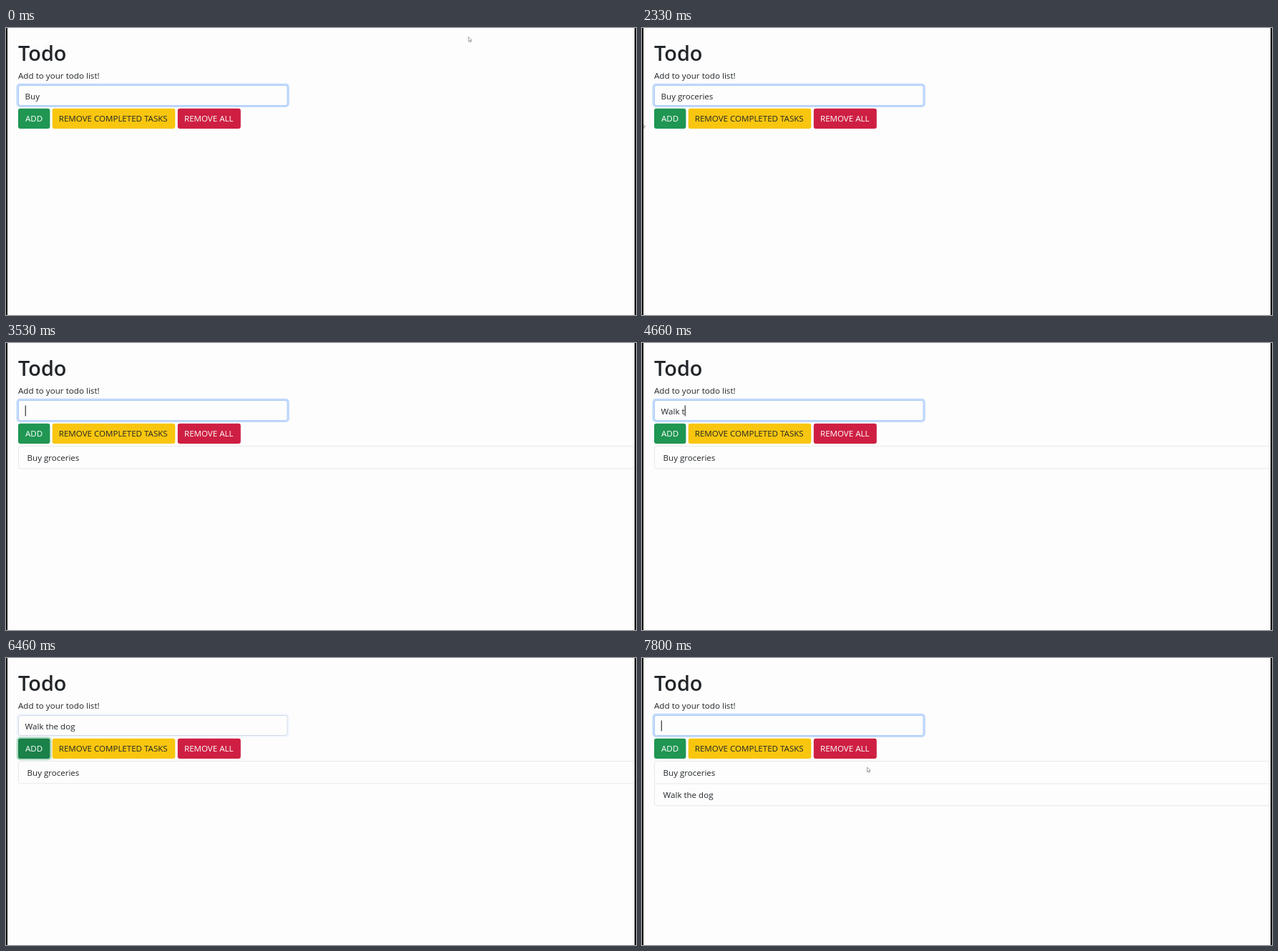
These frames come from a looping animation (880x402 px, 8000 ms). An HTML page:

```html
<!DOCTYPE html>
<html lang="en">
<head>
<meta charset="utf-8">
<title>Todo</title>
<style>
  html, body { margin: 0; width: 100%; height: 100%; overflow: hidden; background: #fdfdfd; }
  svg { display: block; width: 100vw; height: 100vh; }
  text { font: 11.55px "Open Sans", "Noto Sans", sans-serif; fill: #212529; white-space: pre; }
  .title { font-size: 28.8px; font-weight: 600; }
  .light { fill: #fff; }
  .line { fill: none; stroke: #e8e8e8; }
</style>
</head>
<body>
<svg viewBox="0 0 880 402">
  <rect width="880" height="402" fill="#fdfdfd"/>
  <text class="title" x="17" y="45.5">Todo</text>
  <text x="17" y="70.8" style="font-size:11.65px">Add to your todo list!</text>

  <rect id="inputRing" x="14.5" y="77.8" width="381.3" height="33.2" rx="5" fill="#c2dafc"/>
  <rect id="inputBox" x="17.5" y="80.5" width="375.5" height="28" rx="2.8" fill="#fdfdfd"/>
  <text id="entry" x="26.6" y="99.5"></text>
  <rect id="caret" y="87.5" width="1.1" height="15" fill="#222"/>

  <rect id="addRing" x="14.6" y="110.4" width="49.2" height="32.8" rx="5" fill="#a5d5bb"/>
  <rect id="addBox" x="17" y="112.8" width="44.4" height="28.2" rx="3"/>
  <text class="light" x="27" y="131.4">ADD</text>
  <rect x="64.7" y="112.8" width="171.6" height="28.2" rx="3" fill="#f9c60f"/>
  <text x="73.8" y="131.4">REMOVE COMPLETED TASKS</text>
  <rect x="239.8" y="112.8" width="88" height="28.2" rx="3" fill="#ce1f43"/>
  <text class="light" x="249" y="131.4">REMOVE ALL</text>

  <g id="list">
    <rect id="listBox" class="line" x="17.5" y="144.6" width="880" rx="3"/>
    <text x="29.6" y="165.2">Buy groceries</text>
    <g id="second">
      <path class="line" d="M17.5 176H880"/>
      <text x="29.6" y="195.8">Walk the dog</text>
    </g>
  </g>

  <path id="pointer" d="M0 0V6.5L1.5 5.2 2.6 7.5 3.6 7 2.6 4.8H4.8Z" fill="#fff" stroke="#858585" stroke-width=".8"/>
  <path d="M0 0H2V402H0ZM878 0H880V402H878Z"/>
</svg>
<script>
const LOOP = 8000, KEY = 66, BLINK = 530, FADE = 170, LAG = 130, RELEASE = 160;

// Each round: bursts of typing, a press on ADD, then a click back into the input.
const rounds = [
  { bursts: [[-1200, "Buy "], [600, "grocer"], [1150, "ies"]], press: 2700, focus: 3210 },
  { bursts: [[4200, "Wa"], [4400, "lk th"], [4800, "e d"], [5264, "og"]], press: 6340, focus: 6735 }
];

// Stretches in which the arrow shows; it rests at its end point until hidden.
const trips = [
  { start: 0, end: 1, hide: 600, from: [646, 12.5], to: [646, 12.5] },
  { start: 1800, end: 2330, hide: 2440, from: [622, 1], to: [0, 133] },
  { start: 5860, end: 5990, hide: 5990, from: [171, 72.5], to: [152, 78] },
  { start: 7130, end: 7400, hide: LOOP, from: [350, 111], to: [314.5, 153] }
];

const $ = id => document.getElementById(id);
const set = (id, attrs) => {
  for (const key in attrs) $(id).setAttribute(key, attrs[key]);
};
const show = (id, on) => set(id, { visibility: on ? "inherit" : "hidden" });
const mix = (a, b, k) => a + (b - a) * k;
const blend = (a, b, k) => `rgb(${a.map((v, i) => Math.round(mix(v, b[i], k)))})`;

function ease(t, start, length) {
  const k = Math.min(1, Math.max(0, (t - start) / length));
  return k * k * (3 - 2 * k);
}

// Rises to 1 at one moment and falls back at another, summed over the rounds.
const pulse = (t, rise, fall) => rounds.reduce(
  (sum, r) => sum + ease(t, rise(r), FADE) - ease(t, fall(r), FADE), 0);

function typedText(t) {
  const round = rounds.find(r => t < r.press + RELEASE);
  if (!round) return "";
  return round.bursts.map(([at, text]) =>
    text.slice(0, Math.max(0, Math.floor((t - at) / KEY) + 1))).join("");
}

// The blink restarts with every key and every focus.
function caretVisible(t) {
  if (rounds.some(r => t >= r.press && t < r.focus)) return false;
  const wakes = rounds.flatMap(r => [r.focus,
    ...r.bursts.flatMap(([at, text]) => [...text].map((_, i) => at + i * KEY))]);
  const idle = t - Math.max(...wakes.filter(w => w <= t));
  return idle % (2 * BLINK) < BLINK;
}

function placePointer(t) {
  const trip = trips.find(p => t >= p.start && t < p.hide);
  show("pointer", trip);
  if (!trip) return;
  const k = ease(t, trip.start, trip.end - trip.start);
  set("pointer", { transform: `translate(${trip.from.map((v, i) => mix(v, trip.to[i], k))})` });
}

function render(t) {
  const text = typedText(t);
  $("entry").textContent = text;
  show("caret", caretVisible(t));
  set("caret", { x: 26.7 + (text ? $("entry").getComputedTextLength() : 0) });

  const refocus = r => r.focus + LAG;
  const away = pulse(t, r => r.press, refocus);
  const hover = pulse(t, r => r.press - FADE, refocus);
  set("inputRing", { opacity: 1 - away });
  set("inputBox", { stroke: blend([172, 204, 248], [218, 220, 222], away) });
  set("addRing", { opacity: away });
  set("addBox", { fill: blend([32, 150, 83], [26, 129, 73], hover) });

  const items = rounds.filter(r => t >= r.press + RELEASE).length;
  show("list", items > 0);
  show("second", items > 1);
  set("listBox", { height: 31 * items + .3 });
  placePointer(t);
}

const begin = performance.now();
function tick() {
  render((performance.now() - begin) % LOOP);
  requestAnimationFrame(tick);
}
tick();
</script>
</body>
</html>
```
